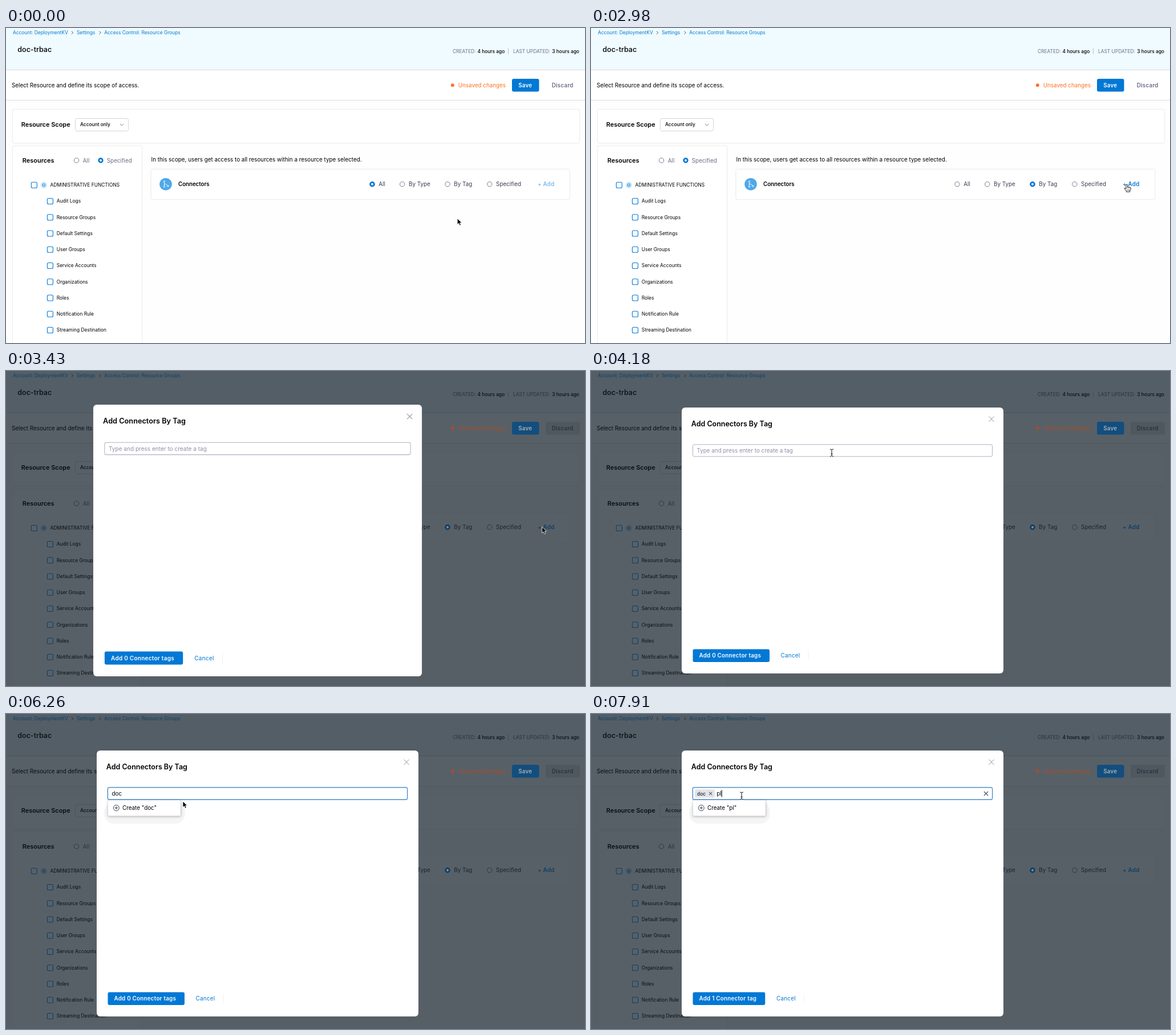
Write an HTML page that moves like this. It is 1015x552 px and loops after 8000 ms.

```html
<!DOCTYPE html>
<html lang="en">
<head>
<meta charset="utf-8">
<title>Resource group tags</title>
<style>
html, body { margin: 0; width: 100%; height: 100%; overflow: hidden; background: #fff; }
svg { display: block; width: 1015px; height: 552px; font-family: Inter, sans-serif; font-size: 9.85px; }
text { white-space: pre; }
.s { font-size: 8.4px; }
.m { font-weight: 500; }
.b { font-weight: 600; }
.btn { font-size: 9.8px; font-weight: 600; letter-spacing: .25px; }
.h { font-size: 10.95px; font-weight: 600; }
.grey { fill: #6b6d85; }
.dark { fill: #3b3c4f; }
.blue { fill: #0278d5; }
.warn { fill: #ff7020; }
.line { fill: none; stroke: #0278d5; }
.card { fill: #fff; filter: drop-shadow(0 .5px 1px rgba(96, 97, 112, .3)); }
.page { fill: #fefefe; }
.tint { fill: none; }
.list { fill: #fff; }
.fade .page { fill: #f1f3f6; }
.fade .tint { fill: #e9e9ec; }
.fade .list { filter: drop-shadow(0 0 2px rgba(96, 97, 112, .35)); }
.dimmed .card { filter: drop-shadow(0 .5px 1px rgba(96, 97, 112, .18)); }
.dimmed .tint { fill: #e6e6e8; }
.dimmed #links { filter: brightness(.55) saturate(.8); }
.dimmed #save { filter: brightness(.68) saturate(.75); }
.dimmed .warn { fill: #a54e2c; }
.pop { fill: #fff; filter: drop-shadow(0 0 .6px rgba(16, 22, 26, .5)) drop-shadow(0 1px 2px rgba(16, 22, 26, .3)); }
</style>
</head>
<body>
<svg viewBox="0 0 1015 552">
  <g id="base"></g>
  <rect id="dim" width="1015" height="552" fill="#0a1620" opacity="0"/>
  <g id="accent"></g>
  <g id="modal"></g>
  <g id="cursor">
    <path id="arrow" d="M0 0V10.6L2.5 8.3L4.2 12.3L6.2 11.4L4.5 7.6H7.9Z" fill="#000" stroke="#fff" stroke-width=".8"/>
    <g id="hand">
      <path d="M-1.3 1Q-1.2 -.4 0 -.4T1.3 1V4.2Q2.4 3.6 3.2 4.6Q4.4 4 5.1 5Q6.8 4.7 6.9 6.3Q7 9.6 5.4 11V12.8H-.9V11.4L-4 7.6Q-4.6 6.4 -3.4 6.1Q-2.4 6.1 -1.3 7.5Z" fill="#fff" stroke="#000" stroke-width=".9"/>
      <path d="M1.3 4.2V6.6M3.2 4.8V6.8M5.1 5.2V7M.7 8.6V11M2.5 8.6V11M4.2 8.6V11" fill="none" stroke="#000" stroke-width=".6"/>
    </g>
    <g id="beam" fill="none">
      <path d="M-3 -6.3Q-.5 -6.3 0 -5Q.5 -6.3 3 -6.3M0 -5V5M-3 6.3Q-.5 6.3 0 5Q.5 6.3 3 6.3M-1.5 2H1.5" stroke="#fff" stroke-width="2.2"/>
      <path d="M-3 -6.3Q-.5 -6.3 0 -5Q.5 -6.3 3 -6.3M0 -5V5M-3 6.3Q-.5 6.3 0 5Q.5 6.3 3 6.3M-1.5 2H1.5" stroke="#111" stroke-width="1"/>
    </g>
  </g>
</svg>
<script>
const $ = id => document.getElementById(id);
const text = (x, y, str, cls = '', extra = '') => `<text x="${x}" y="${y}" class="${cls}" ${extra}>${str}</text>`;
const rect = (x, y, w, h, r, attrs) => `<rect x="${x}" y="${y}" width="${w}" height="${h}" rx="${r}" ${attrs}/>`;
const circle = (x, y, r, attrs) => `<circle cx="${x}" cy="${y}" r="${r}" ${attrs}/>`;
const path = (d, stroke, width = 1, attrs = '') => `<path d="${d}" fill="none" stroke="${stroke}" stroke-width="${width}" ${attrs}/>`;
const cross = (x, y, r, stroke, width) =>
  path(`M${x - r} ${y - r}l${2 * r} ${2 * r}m0 ${-2 * r}l${-2 * r} ${2 * r}`, stroke, width);
const radio = (x, y) => circle(x, y, 4.2, 'fill="#fff" stroke="#6b6d85" stroke-width=".9"');
const picked = (x, y) => circle(x, y, 3.3, 'fill="#fff" stroke="#0278d5" stroke-width="2.7"');
const box = (x, y) => rect(x - 5, y - 5, 10, 10, 2, 'class="line" stroke-width="1.1"');

const items = ['Audit Logs', 'Resource Groups', 'Default Settings', 'User Groups', 'Service Accounts',
  'Organizations', 'Roles', 'Notification Rule', 'Streaming Destination'];
const rowY = i => 303.3 + i * 28.25;

$('base').innerHTML = [
  rect(0, 0, 1015, 552, 0, 'class="page"'),
  rect(0, 0, 1015, 73.5, 0, 'fill="#effbff"'),
  rect(0, 73.5, 1015, 53, 0, 'fill="#fff"'),
  path('M0 73.5H1015M0 126.5H1015', '#d9dae5'),
  path('M115 5.6l2.6 2.6l-2.6 2.6M163.5 5.6l2.6 2.6l-2.6 2.6', '#4f5162'),
  text(20.3, 42.3, 'doc-trbac', 'm', 'font-size="12.55"'),
  text(783, 43.6, 'CREATED:', 's grey'),
  text(826.5, 43.6, '4 hours ago', 's m'),
  path('M880.5 35.5V46', '#b0b1c4', .8),
  text(889, 43.6, 'LAST UPDATED:', 's grey'),
  text(957.3, 43.6, '3 hours ago', 's m'),
  text(10, 103.7, 'Select Resource and define its scope of access.'),
  rect(946, 89, 60, 22.5, 3, 'class="tint"'),
  text(956.7, 103.7, 'Discard', 'btn grey'),
  rect(12, 143, 993, 58.5, 3, 'class="card"'),
  text(26.7, 173.3, 'Resource Scope', 'h'),
  rect(121.5, 158.5, 93, 22, 3, 'fill="#fff" stroke="#d3d4e0"'),
  text(130, 172.3, 'Account only', 's m'),
  path('M200 168l3.2 3.2l3.2 -3.2', '#6b6d85', .9),
  rect(12, 207, 226, 360, 3, 'class="card"'),
  text(28.8, 236, 'Resources', 'h'),
  radio(123.5, 232),
  text(134.8, 235.6, 'All', 'grey'),
  text(176.8, 235.6, 'Specified', 'grey'),
  rect(29, 251, 192, 320, 3, 'class="list"'),
  circle(66.3, 275.2, 5.7, 'fill="#cde9fb"'),
  circle(66.3, 275.2, 2, 'fill="#fff" stroke="#2f8fdd" stroke-width="1.3"'),
  text(77.5, 278, 'ADMINISTRATIVE FUNCTIONS', 's'),
  items.map((name, i) => text(88.8, rowY(i) + 3, name, 's')).join(''),
  text(254.5, 233.8, 'In this scope, users get access to all resources within a resource type selected.'),
  rect(254.5, 248, 733.5, 52, 3, 'class="card"'),
  circle(280, 273.7, 10.8, 'fill="#4fa8ea"'),
  path('M277.5 270V277M277.5 273.5H280.2L283 276', '#fff', .9),
  [[277.5, 269], [277.5, 278], [284, 277]]
    .map(([x, y]) => circle(x, y, 1.3, 'fill="none" stroke="#fff" stroke-width=".8"')).join(''),
  text(302, 277.2, 'Connectors', 'b', 'font-size="9.7"'),
  [[642, 'All'], [694.7, 'By Type'], [774, 'By Tag'], [847.8, 'Specified']]
    .map(([x, label]) => radio(x, 273.7) + text(x + 11.3, 277.3, label, 'dark')).join('')
].join('');

$('accent').innerHTML = [
  '<g id="links">',
  text(12, 11, 'Account: DeploymentKV', 's blue'),
  text(124, 11, 'Settings', 's blue'),
  text(172.3, 11, 'Access Control: Resource Groups', 's blue'),
  picked(166, 232),
  box(49.3, 275.2),
  items.map((_, i) => box(77.4, rowY(i) + .2)).join(''),
  `<g id="pick">${picked(0, 273.7)}</g>`,
  text(932, 277.3, '+ Add', 'btn blue', 'id="add"'),
  '</g>',
  circle(782.8, 100.2, 2.9, 'class="warn"'),
  text(792.7, 103.7, 'Unsaved changes', 'warn'),
  '<g id="save">',
  rect(887, 89, 47.5, 22.5, 3, 'class="blue"'),
  text(898.2, 103.7, 'Save', 'btn', 'fill="#fff"'),
  '</g>'
].join('');

$('modal').innerHTML = [
  rect(159, 64, 564, 466, 6, 'fill="#fff"'),
  text(175.8, 96.6, 'Add Connectors By Tag', 'b', 'font-size="12.47"'),
  cross(702, 84.3, 4.6, '#8f90a6', 1),
  rect(177.4, 127.8, 527, 23.1, 3, 'id="ring" fill="#9cc5e8"'),
  rect(178.5, 128.9, 525, 20.9, 2.5, 'id="field" fill="#fff"'),
  text(185.5, 143, 'Type and press enter to create a tag', '', 'id="hint" fill="#8f90a6"'),
  '<g id="chip">',
  rect(182, 132.2, 35, 14.2, 2, 'fill="#e2e3e9"'),
  text(186, 142.5, 'doc', 's'),
  cross(209.6, 139.4, 2.5, '#5c5d6b', 1.1),
  cross(692.5, 139.5, 3.6, '#3c4a5e', 1.3),
  '</g>',
  text(0, 143, '', '', 'id="typed"'),
  rect(0, 133.2, 1, 12.6, 0, 'id="caret"'),
  '<g id="menu">',
  rect(172, 155, 142, 37, 17, 'fill="#f5f5f6"'),
  rect(179, 151, 127.3, 27.7, 2, 'class="pop"'),
  circle(193.3, 164.6, 5, 'fill="none" stroke="#3b3c4f" stroke-width="1"'),
  path('M190.5 164.6h5.6m-2.8 -2.8v5.6', '#3b3c4f', 1),
  text(204, 168, '', '', 'id="create"'),
  '</g>',
  rect(178.5, 487.5, 134.5, 22.5, 3, 'id="submit" class="blue"'),
  text(189.5, 502.3, '', 'btn', 'id="count" fill="#fff"'),
  '<g id="cancel">',
  text(332.6, 502.3, 'Cancel', 'blue', 'letter-spacing=".25"'),
  path('M381 490V508', '#f1f1f5', 1),
  '</g>'
].join('');

// [time, x, y, pointer]
const moves = [
  [0, 791.2, 333.8, 'arrow'], [1050, 803, 315, 'arrow'], [1200, 809, 292, 'arrow'], [1350, 806, 262, 'arrow'],
  [1500, 790, 240, 'arrow'], [1650, 768, 234, 'arrow'], [1800, 754, 246, 'arrow'], [1940, 764, 266, 'arrow'],
  [2090, 773, 275, 'hand'], [2540, 800, 279, 'hand'], [2690, 862, 281, 'hand'], [2840, 918, 279, 'arrow'],
  [2980, 939.3, 274.3, 'hand'], [3280, 939.7, 273.3, 'arrow'], [3580, 890, 258, 'arrow'], [3730, 750, 222, 'arrow'],
  [3880, 585, 182, 'arrow'], [4030, 470, 154, 'arrow'], [4180, 422, 143.3, 'beam'],
  [6110, 385, 142, 'beam'], [6260, 310, 153, 'arrow'], [6410, 255, 163, 'arrow'], [6560, 242, 165.2, 'arrow'],
  [7010, 249, 157, 'arrow'], [7160, 264, 143.3, 'beam']
];
// [time, typed text]
const typing = [[0, ''], [4780, 'd'], [4930, 'do'], [5070, 'doc'], [6710, ''], [7760, 'p'], [7910, 'pl']];
// [time, scale, modal opacity, page dim]
const opening = [[0, 1, 0, 0], [3280, .587, .2, .19], [3430, 1.0215, 1, .68], [3580, 1, 1, .68]];

const at = (steps, t) => steps.findLast(s => s[0] <= t);
const show = (id, on) => $(id).style.display = on ? '' : 'none';
const set = (id, attrs) => Object.entries(attrs).forEach(([k, v]) => $(id).setAttribute(k, v));
const svg = document.querySelector('svg');

function draw(t) {
  const [, x, y, pointer] = at(moves, t);
  set('cursor', { transform: `translate(${x} ${y})` });
  ['arrow', 'hand', 'beam'].forEach(id => show(id, id === pointer));

  const byTag = t >= 2240;
  set('pick', { transform: `translate(${byTag ? 774 : 642} 0)` });
  set('add', { opacity: byTag ? 1 : .5 });

  const [, scale, alpha, dim] = at(opening, t);
  set('dim', { opacity: dim });
  set('modal', { opacity: alpha, transform: `translate(441 297) scale(${scale}) translate(-441 -297)` });
  svg.setAttribute('class', dim > .5 ? 'dimmed' : dim ? 'fade' : '');

  const word = at(typing, t)[1];
  const tagged = t >= 6710;
  const focus = t >= 4330;
  const left = tagged ? 220.3 : 185.5;
  show('ring', t >= 4480);
  set('field', { stroke: focus ? '#2f80c4' : '#b0b1c4' });
  show('hint', !word && !tagged);
  show('chip', tagged);
  $('typed').textContent = word;
  set('typed', { x: left });
  set('caret', { x: left + (word ? $('typed').getComputedTextLength() : 0) });
  show('caret', focus && !(t >= 5520 && t < 6710) && !(t >= 7310 && t < 7760));
  show('menu', word);
  $('create').textContent = `Create "${word}"`;
  $('count').textContent = tagged ? 'Add 1 Connector tag' : 'Add 0 Connector tags';
  set('submit', { width: tagged ? 126.8 : 134.5 });
  set('cancel', { transform: `translate(${tagged ? -7.6 : 0} 0)` });
}

const start = performance.now();
function tick() {
  draw((performance.now() - start) % 8000);
  requestAnimationFrame(tick);
}
tick();
</script>
</body>
</html>
```
